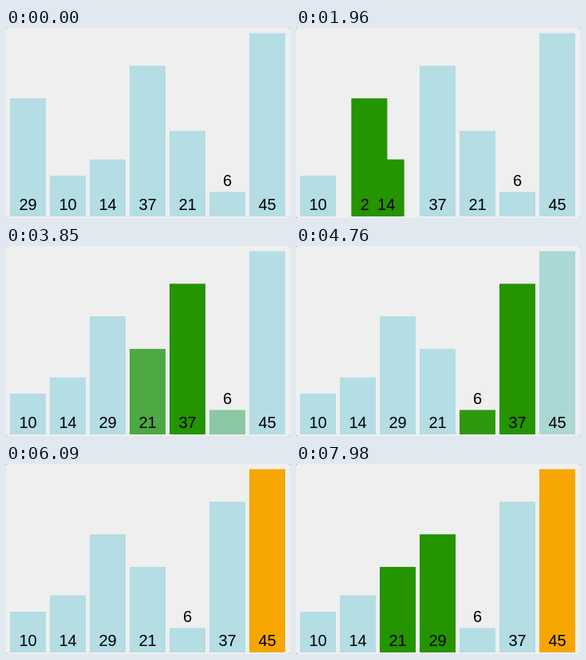
These frames come from a looping animation (356 px wide and 238 px high, 8 s). An HTML page with a canvas:

```html
<!DOCTYPE html>
<html lang="en">
<head>
<meta charset="utf-8">
<title>Bubble sort</title>
<style>
  html, body { margin: 0; width: 100%; height: 100%; overflow: hidden; background: #8a8a8a; }
  canvas { display: block; border-radius: 2px; }
</style>
</head>
<body>
<canvas id="stage" width="356" height="238"></canvas>
<script>
const ctx = document.getElementById('stage').getContext('2d');
const LOOP = 8000, START = 450, PERIOD = 472.5, MOVE = 225;
const BASE = 236, UNIT = 5.1, SLOT = 50, WIDTH = 45;
const BLUE = [180, 221, 228], GREEN = [36, 148, 0], ORANGE = [245, 166, 0];
const values = [29, 10, 14, 37, 21, 6, 45];

// Each step either swaps two values or recolours some of them.
const steps = [
  { green: [29, 10] },
  { swap: [29, 10] },
  { blue: [10], green: [14] },
  { swap: [29, 14] },
  { blue: [14], green: [37] },
  { blue: [29], green: [21] },
  { swap: [37, 21] },
  { blue: [21], green: [6] },
  { swap: [37, 6] },
  { blue: [6], green: [45] },
  { blue: [37], orange: [45] },
  {},
  { green: [10, 14] },
  { blue: [10], green: [29] },
  { blue: [14], green: [21] },
  { swap: [29, 21] }
];

const clamp = x => Math.min(1, Math.max(0, x));
const ease = x => x < 0.5 ? 4 * x ** 3 : 1 - 4 * (1 - x) ** 3;
const mix = (a, b, p) => a + (b - a) * p;

function barsAt(time) {
  const bars = values.map((value, slot) => ({ value, slot, color: BLUE }));
  const find = value => bars.find(bar => bar.value === value);
  const paint = (list = [], color, p) => list.map(find).forEach(bar => {
    bar.color = bar.color.map((c, i) => mix(c, color[i], p));
  });
  steps.forEach(({ swap, blue, green, orange }, n) => {
    const p = ease(clamp((time - START - n * PERIOD) / MOVE));
    if (!p) return;
    paint(blue, BLUE, p);
    paint(green, GREEN, p);
    paint(orange, ORANGE, p);
    if (swap) {
      const [a, b] = swap.map(find);
      [a.slot, b.slot] = [mix(a.slot, b.slot, p), mix(b.slot, a.slot, p)];
    }
  });
  return bars;
}

function drawBar({ value, slot, color }) {
  const x = 5 + slot * SLOT, height = value * UNIT;
  ctx.fillStyle = `rgb(${color.map(Math.round)})`;
  ctx.fillRect(x, BASE - height, WIDTH, height);
  ctx.fillStyle = '#000';
  ctx.fillText(value, x + WIDTH / 2, value < 10 ? BASE - height - 7.4 : 228);
}

function frame() {
  ctx.fillStyle = '#efefef';
  ctx.fillRect(0, 0, 356, 238);
  ctx.font = '20px "Liberation Sans", Arial, sans-serif';
  ctx.textAlign = 'center';
  barsAt(performance.now() % LOOP).forEach(drawBar);
  requestAnimationFrame(frame);
}
frame();
</script>
</body>
</html>
```
